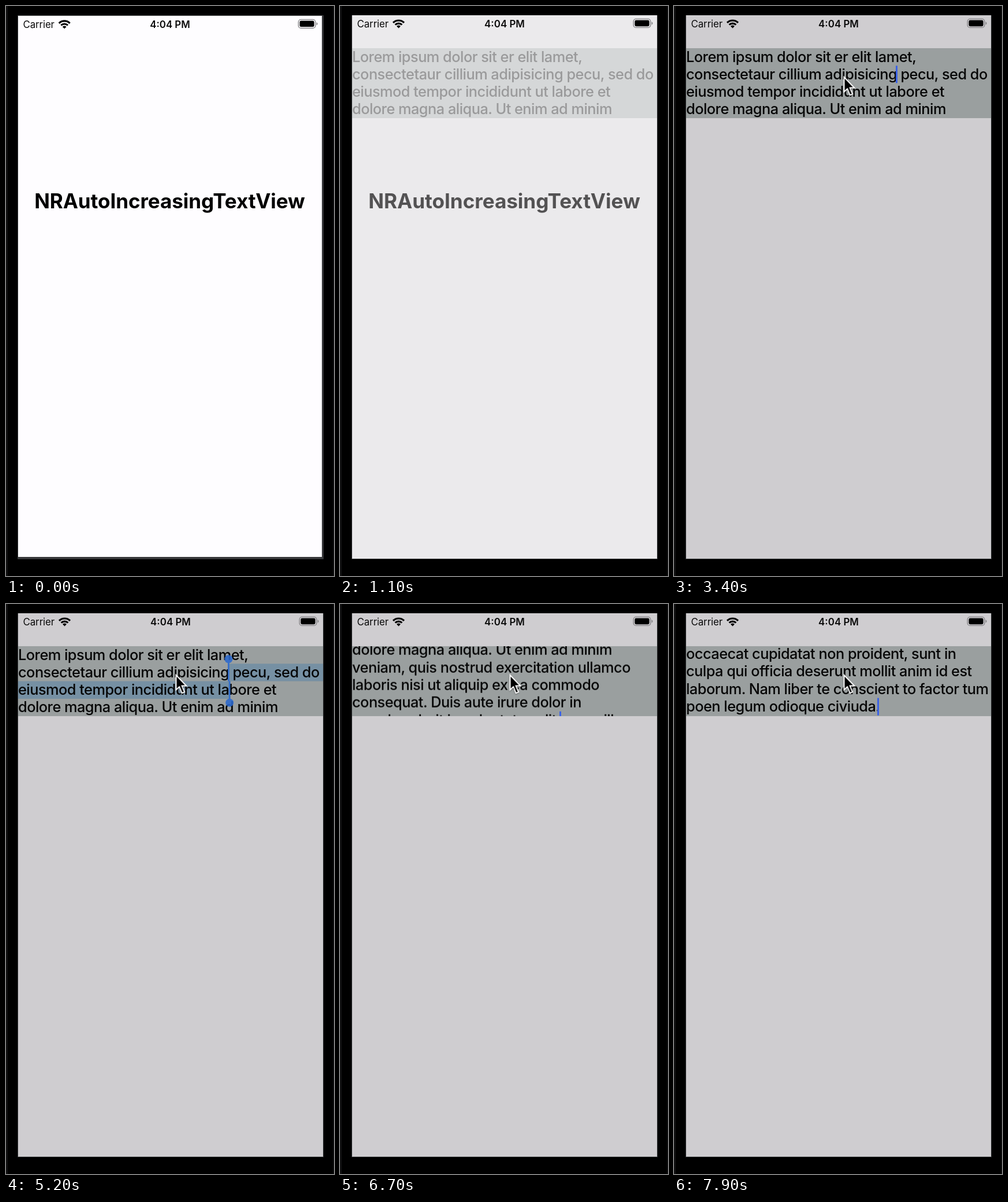
An HTML page that plays this animation: 568x986 px, repeating every 8 s.

```html
<!DOCTYPE html>
<html lang="en">
<head>
<meta charset="utf-8">
<title>NRAutoIncreasingTextView</title>
<style>
html, body { margin: 0; width: 100%; height: 100%; overflow: hidden; background: #000; }
body { font-family: Inter, "Liberation Sans", sans-serif; font-optical-sizing: none; }
div, svg { position: absolute; }

#stage { left: 0; top: 0; width: 568px; height: 986px; overflow: hidden;
  background: linear-gradient(90deg, #101011 3px, #000 3px 566px, #0c0c0d 566px); }
#edge { left: 20px; top: 16px; width: 530px; height: 941px; background: #38393b; }
#screen { left: 21px; top: 16px; width: 528px; height: 940px; overflow: hidden;
  background: #fefdff; transform-origin: 0 0; }
#title { left: 0; width: 527px; top: 301px; text-align: center; white-space: pre;
  font-weight: 700; font-size: 35.2px; line-height: 40px; letter-spacing: -.08px; color: #000; }
#page { inset: 0; background: #cfcdd0; opacity: 0; }
#view { left: 0; top: 56.5px; width: 528px; height: 121px; overflow: hidden; background: #9a9f9f; }
#text { left: 0; top: 0; width: 528px; }
#lines { left: 0; top: 0; white-space: pre; color: #050505;
  font-weight: 500; font-size: 25.34px; line-height: 30.3px; letter-spacing: -.51px; }
#text svg { left: 0; top: 0; }
.sel { opacity: 0; }
#caret { left: 0; top: 0; width: 2.8px; height: 30.6px; background: #3b63e6; opacity: 0; }
#cursor { left: 0; top: 0; opacity: 0; overflow: visible; filter: drop-shadow(0 1px 1px #0006); }
.bar { top: 4.7px; line-height: 20px; font-size: 16.9px; color: #0a0a0a; white-space: pre; }
#carrier { left: 8.5px; letter-spacing: -.1px; }
#clock { left: 0; width: 528px; text-align: center; font-weight: 600; }
#icons { left: 0; top: 0; }

/* 1.25% of the cycle is one 100 ms step */
#screen, #page, #text, .sel, #caret, #cursor { animation: 8s step-end -5ms infinite; }
#screen { animation-name: settle; }
#page { animation-name: dissolve; }
#text { animation-name: scroll; }
.sel { animation-name: select; }
#caret { animation-name: caret; }
#cursor { animation-name: point; }

@keyframes settle {
  0% { transform: translateY(1px) scale(.9962, .9957); }
  1.25% { transform: translateY(.5px) scale(.9981, .9979); }
  2.5%, 100% { transform: none; }
}
@keyframes dissolve {
  0% { opacity: 0; }
  13.75% { opacity: .4; }
  15% { opacity: .8; }
  16.25%, 100% { opacity: 1; }
}
@keyframes point {
  0% { opacity: 0; transform: translate(298.5px, 172px); }
  26.25% { opacity: 1; }
  27.5% { transform: translate(298px, 165px); }
  28.75% { transform: translate(296px, 145px); }
  30% { transform: translate(295px, 129px); }
  31.25%, 100% { opacity: 1; transform: translate(294.5px, 123px); }
}
@keyframes caret {
  0% { opacity: 0; transform: translate(448px, 90.9px); }
  27.5% { opacity: 1; }
  31.25% { transform: translate(363px, 30.3px); }
  33.75% { opacity: .5; }
  35% { opacity: 0; }
  42.5% { opacity: 1; }
  48.75% { opacity: .7; }
  50% { opacity: .3; }
  51.25% { opacity: 0; }
  53.75% { opacity: .5; }
  55% { opacity: 1; }
  61.25% { opacity: .4; }
  62.5% { opacity: 0; }
  71.25% { opacity: 1; transform: translate(363px, 90.9px); }
  73.75% { transform: translate(363px, 121.2px); }
  76.25% { transform: translate(363px, 151.5px); }
  78.75% { transform: translate(363px, 181.8px); }
  83.75% { transform: translate(359px, 212.1px); }
  85% { transform: translate(361px, 242.4px); }
  86.25% { transform: translate(361px, 272.7px); }
  87.5% { transform: translate(361px, 303px); }
  88.75% { transform: translate(361px, 333.3px); }
  90% { transform: translate(331px, 363.6px); }
  91.25% { opacity: .5; }
  92.5% { opacity: 0; }
  98.75%, 100% { opacity: 1; transform: translate(331px, 363.6px); }
}
@keyframes select {
  0% { opacity: 0; }
  65% { opacity: .88; }
  66.25% { opacity: .92; }
  67.5% { opacity: .96; }
  68.75% { opacity: 1; }
  71.25%, 100% { opacity: 0; }
}
@keyframes scroll {
  0% { transform: none; }
  71.25% { transform: translateY(-5px); }
  72.5% { transform: translateY(-17px); }
  73.75% { transform: translateY(-32px); }
  75% { transform: translateY(-47px); }
  76.25% { transform: translateY(-62px); }
  77.5% { transform: translateY(-76px); }
  78.75% { transform: translateY(-86px); }
  80% { transform: translateY(-91px); }
  83.75% { transform: translateY(-99.3px); }
  85% { transform: translateY(-120px); }
  86.25% { transform: translateY(-150px); }
  87.5% { transform: translateY(-183px); }
  88.75% { transform: translateY(-215px); }
  90% { transform: translateY(-245px); }
  91.25% { transform: translateY(-265px); }
  92.5%, 100% { transform: translateY(-274px); }
}
</style>
</head>
<body>
<div id="stage">
  <div id="edge"></div>
  <div id="screen">
    <div id="title">NRAutoIncreasingTextView</div>
    <div id="page">
      <div id="view">
        <div id="text">
          <svg class="sel" width="528" height="121" fill="#3374ac" fill-opacity=".38">
            <path d="M365 30.3H528V60.6H367V90.9H0V60.6H365Z"/>
          </svg>
          <div id="lines">Lorem ipsum dolor sit er elit lamet,
consectetaur cillium adipisicing pecu, sed do
eiusmod tempor incididunt ut labore et
dolore magna aliqua. Ut enim ad minim
veniam, quis nostrud exercitation ullamco
laboris nisi ut aliquip ex ea commodo
consequat. Duis aute irure dolor in
reprehenderit in voluptate velit esse cillum
dolore eu fugiat nulla pariatur. Excepteur sint
occaecat cupidatat non proident, sunt in
culpa qui officia deserunt mollit anim id est
laborum. Nam liber te conscient to factor tum
poen legum odioque civiuda.</div>
          <svg class="sel" width="528" height="121" fill="#2b69cf" stroke="#2b69cf" stroke-width="2.8">
            <path d="M364.4 22V60.6M366.2 60.6V98"/>
            <g stroke="none"><circle cx="364.4" cy="22.3" r="7"/><circle cx="366.2" cy="97.8" r="7"/></g>
          </svg>
          <div id="caret"></div>
        </div>
      </div>
    </div>
    <div id="carrier" class="bar">Carrier</div>
    <div id="clock" class="bar">4:04 PM</div>
    <svg id="icons" width="528" height="40">
      <g transform="translate(80.5 22.4)" fill="none" stroke="#000" stroke-width="3.1">
        <path d="M-9.5-9.5A13.4 13.4 0 0 1 9.5-9.5M-5.9-5.9A8.4 8.4 0 0 1 5.9-5.9"/>
        <path d="M0 0L-3.4-3.4A4.8 4.8 0 0 1 3.4-3.4Z" fill="#000" stroke="none"/>
      </g>
      <rect x="487.2" y="6.4" width="29.6" height="15" rx="4.4" fill="none" stroke="#858487" stroke-width="1.4"/>
      <rect x="489.4" y="8.6" width="25.2" height="10.6" rx="2.4"/>
      <path d="M518.6 11.3Q520.6 12.1 520.6 13.9T518.6 16.5Z" fill="#858487"/>
    </svg>
  </div>
  <svg id="cursor" width="24" height="38">
    <path d="M0 0V25.5L5.7 20.2 10.2 31.2 14.6 29.3 10.2 18.6H17.8Z" fill="#000" stroke="#fff" stroke-width="2"/>
  </svg>
</div>
</body>
</html>
```
